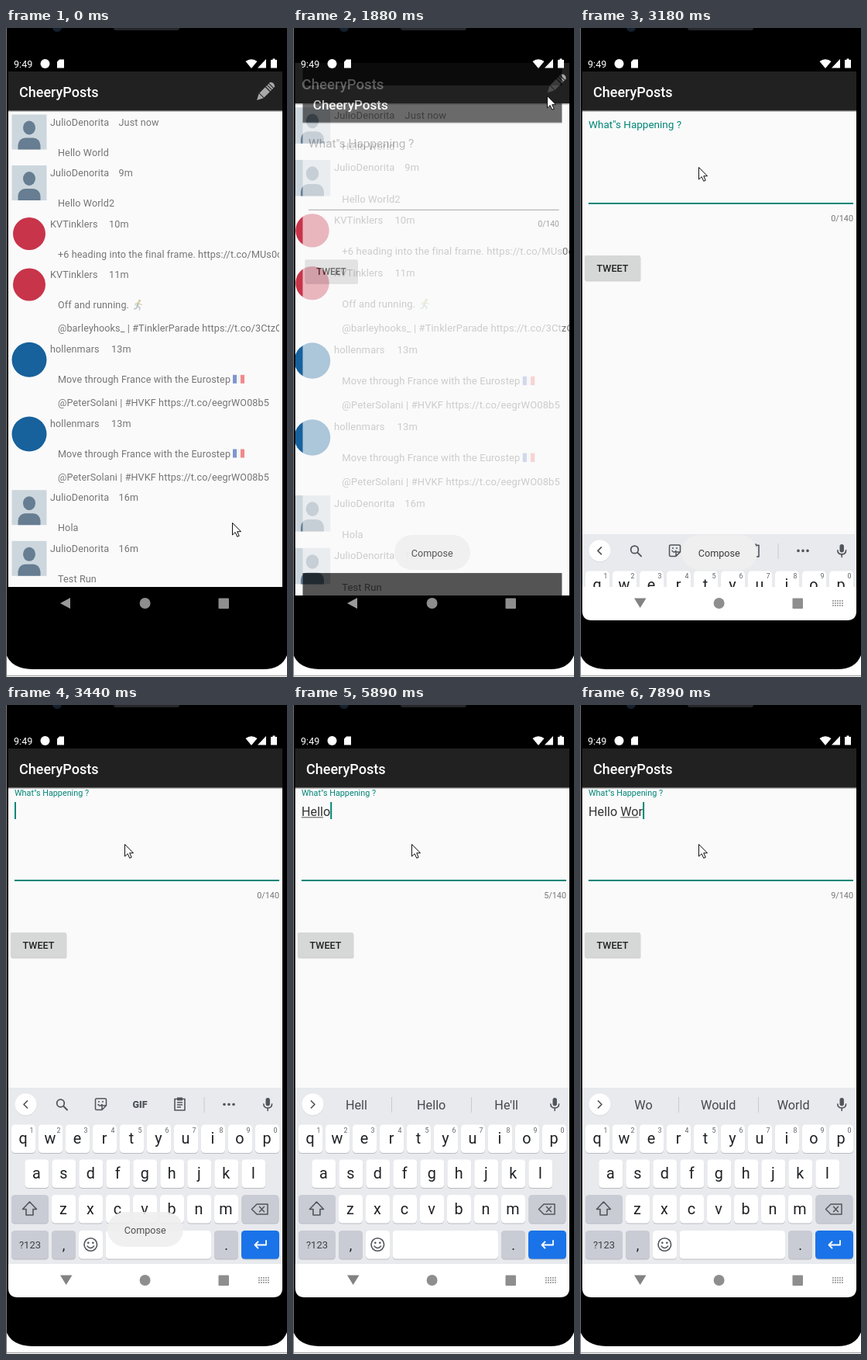
Animation, 363 px wide and 836 px high, one loop 8 s. Source, as an HTML page:

```html
<!DOCTYPE html>
<html lang="en">
<head>
<meta charset="utf-8">
<title>CheeryPosts</title>
<style>
html, body { margin: 0; width: 100%; height: 100%; overflow: hidden; background: #fff; }
svg { display: block; width: 100vw; height: 100vh; font-family: Roboto, sans-serif; }
text { white-space: pre; }
.list { letter-spacing: .12px; }
</style>
</head>
<body>
<svg id="stage" viewBox="0 0 363 836"></svg>
<script>
const LOOP = 8000, INK = 16.2;
const GREY = '#757575', TEAL = '#008577', BAR = '#212121', PAGE = '#fafafa';

const rect = (x, y, w, h, fill, extra = '') =>
  `<rect x="${x}" y="${y}" width="${w}" height="${h}" fill="${fill}" ${extra}/>`;
const circle = (x, y, r, fill, extra = '') =>
  `<circle cx="${x}" cy="${y}" r="${r}" fill="${fill}" ${extra}/>`;
const path = (d, fill, extra = '') => `<path d="${d}" fill="${fill}" ${extra}/>`;
const line = (d, color, w = 1.6) =>
  path(d, 'none', `stroke="${color}" stroke-width="${w}" stroke-linecap="round" stroke-linejoin="round"`);
const text = (x, y, s, size, fill, extra = '') =>
  `<text x="${x}" y="${y}" font-size="${size}" fill="${fill}" ${extra}>${s}</text>`;
const group = (id, body, extra = '') => `<g id="${id}" ${extra}>${body}</g>`;
const MID = 'text-anchor="middle"';

// ---- phone and system bars ----
function phone() {
  return path('M0 0H363V808Q356 826 332 826H34Q6 825 0 806Z', '#000') +
    line('M0.5 0V836', '#777', 1) + line('M0 834.5H363', '#999', 1) +
    circle(66, -1, 6, '#14202e') + rect(139, -4, 85, 7, '#242628', 'rx="3"');
}
function status() {
  return text(10, 50.5, '9:49', 12.6, '#fff') +
    circle(50.5, 46, 6, '#fff') +
    path('M69 40.5H75V51.5H66V43.5Z', '#fff') +
    path('M309.5 43Q317 37.5 324.5 43L317 52Z', '#fff') +
    path('M336 40V51.5H325Z', '#fff') +
    path('M344.5 39.5H347.5V41H350V51.5H342V41H344.5Z', '#fff');
}
function nav() {
  const dots = [0, 1, 2].map(r => [0, 1, 2, 3, 4].map(c =>
    rect(326 + c * 3, 737 + r * 3, 1.8, 1.8, '#999')).join('')).join('');
  return group('navLight', path('M3 720H357V751Q357 763 345 763H15Q3 763 3 751Z', '#fff') +
      path('M70 734.5H85.5L77.7 747Z', '#828282') + dots) +
    group('navDark', path('M83 734V748L70 741Z', '#9a9a9a')) +
    circle(179.6, 741, 7, '#8e8e8e') + rect(274.5, 734.5, 13.5, 13.5, '#8e8e8e', 'rx="1"');
}
// page, bars and title shared by both screens
const frame = () => rect(3, 106, 354, 614, PAGE) + rect(3, 720, 354, 43, '#000') +
  rect(3, 13, 354, 44, '#000') + rect(3, 106, 354, 2, '#000', 'opacity=".25"') +
  rect(3, 56, 354, 50.5, BAR) + text(17, 89, 'CheeryPosts', 18, '#fff', 'font-weight="500"');

// ---- timeline screen ----
const pencil = () => `<g transform="translate(335 82) rotate(45)">` +
  path('M-4.2 7.5H4.2L0 15.5Z', '#a8a8a8') + rect(-4.2, -4, 8.4, 10.5, '#a8a8a8') +
  rect(-4.2, -7.2, 8.4, 2, '#a8a8a8') + rect(-4.2, -10.2, 8.4, 2, '#a8a8a8') +
  path('M-4.2 -11.2V-13Q0 -17 4.2 -13V-11.2Z', '#a8a8a8') + '</g>';

const person = y => rect(7.5, y - 9.5, 45, 45, '#ccd6dd') +
  path(`M15.5 ${y + 35.5}V${y + 30}Q16.5 ${y + 21} 25 ${y + 20.5}H35Q43.5 ${y + 21} 44.5 ${y + 30}V${y + 35.5}Z`, '#667d92') +
  `<ellipse cx="30" cy="${y + 7.5}" rx="8" ry="9" fill="#667d92"/>`;
const avatars = {
  user: person,
  red: y => circle(30, y + 13, 21, '#c8344a'),
  blue: y => circle(30, y + 14, 22.5, '#17619c')
};
const runner = y => `<g opacity=".6">` + circle(172.5, y - 9.5, 1.8, '#c9b258') +
  line(`M171 ${y - 7}L169.5 ${y - 3}`, '#6f9fb8', 2.4) +
  line(`M169.5 ${y - 2}L173 ${y - 1}L172.5 ${y + 2}M169.5 ${y - 2}L168.5 ${y}L165.5 ${y + 1}`, '#8fa0a0', 1.4) +
  line(`M171 ${y - 7}L167.5 ${y - 6}L167 ${y - 4}M171.5 ${y - 6}L175.5 ${y - 4.5}`, '#c9b258', 1.2) + '</g>';
const flag = y => rect(293, y - 10, 5, 11, '#7f96cf') + rect(298, y - 10, 5, 11, '#f4f4f4') +
  rect(303, y - 10, 5, 11, '#f08a8c');

const USER = ['JulioDenorita', 145.5, 'user'], TEAM = ['KVTinklers', 133, 'red'], CLUB = ['hollenmars', 136, 'blue'];
const trip = ['Move through France with the Eurostep', '@PeterSolani | #HVKF https://t.co/eegrWO08b5'];
const posts = [
  [121, USER, 'Just now', ['Hello World']],
  [186.5, USER, '9m', ['Hello World2']],
  [252, TEAM, '10m', ['+6 heading into the final frame. https://t.co/MUs0cQ']],
  [317.5, TEAM, '11m', ['Off and running.', '@barleyhooks_ | #TinklerParade https://t.co/3CtzO4k'], runner],
  [413.3, CLUB, '13m', trip, flag],
  [509, CLUB, '13m', trip, flag],
  [604.7, USER, '16m', ['Hola']],
  [670.3, USER, '16m', ['Test Run']]
];
const post = ([y, [name, ageX, face], age, body, emoji]) => avatars[face](y) +
  text(57, y + 4.5, name, 12.6, GREY) + text(ageX, y + 4.5, age, 12.6, GREY) +
  body.map((s, i) => text(67, y + 43.5 + i * 30.3, s, 12.6, GREY)).join('') +
  (emoji ? emoji(y + 43.5) : '');
const timeline = () => frame() +
  circle(332, 82.5, 15, '#fff', 'id="ripple" opacity=".14"') + pencil() +
  `<g class="list" clip-path="url(#listClip)">${posts.map(post).join('')}</g>`;

// ---- compose screen ----
const compose = () => frame() +
  `<text id="hint" x="11">What"s Happening ?</text>` +
  text(11, 143, '', INK, '#333', 'id="typed"') + rect(11, 144.3, 0, 1, '#555', 'id="under"') +
  rect(11, 125, 2, 22, TEAL, 'id="caret"') + rect(11, 225, 342, 1, GREY, 'id="rule"') +
  text(353, 248.5, '0/140', 10.8, GREY, 'id="count" text-anchor="end"') +
  rect(6.5, 294.5, 72, 32, '#000', 'rx="2" opacity=".16"') + rect(6, 293, 72, 32, '#d6d7d7', 'rx="2"') +
  text(42, 314, 'TWEET', 12.6, '#212121', MID + ' font-weight="500"');

const toast = () => rect(131, 653, 98, 45, '#efefef', 'rx="22.5"') +
  text(179.8, 681, 'Compose', 12.6, '#3a3a3a', MID);

// ---- keyboard ----
const DARK = '#202124', ICON = '#50555a', SIDE = '#c9ccd4';
const key = (x, y, w, fill = '#fff') => rect(x, y + 1, w, 36.5, '#b9bcc2', 'rx="4.5"') + rect(x, y, w, 36.5, fill, 'rx="4.5"');
const keyRow = (chars, x0, y, digits) => [...chars].map((c, i) => {
  const x = x0 + 35 * i;
  return key(x, y, 31) + text(x + 15, y + 24.7, c, 19.8, DARK, MID) +
    (digits ? text(x + 26, y + 10, (i + 1) % 10, 8.8, '#5f6368', MID) : '');
}).join('');
const tools = () =>
  circle(70.5, 513, 4.8, 'none', `stroke="${ICON}" stroke-width="1.8"`) + line('M74.5 517L79 521.5', ICON, 2) +
  line('M117 507H128Q129.5 507 129.5 508.5V516L124 521.5H117Q115.5 521.5 115.5 520V508.5Q115.5 507 117 507ZM129.5 516H124V521.5M119 514.5Q121.5 518 124 514.5', ICON, 1.5) +
  circle(120, 511, 1, ICON) + circle(125, 511, 1, ICON) +
  text(173, 518.5, 'GIF', 12.5, ICON, MID + ' font-weight="900"') +
  line('M218 507.5H231V522H218ZM221.5 512H227.5M221.5 515H227.5M221.5 518H225.5', ICON, 1.6) + rect(221, 505.5, 7, 4, ICON) +
  rect(255.5, 505, 1, 20, '#c8cbcf') +
  [282, 288, 294].map(x => circle(x, 514.5, 1.8, ICON)).join('');
const words = () => rect(127, 505, 1, 20, '#c8cbcf') + rect(230, 505, 1, 20, '#c8cbcf') +
  [82, 178.7, 275.7].map((x, i) => text(x, 521, '', INK, '#45494d', `${MID} id="word${i}"`)).join('');
const keyboard = () => rect(3, 493, 354, 228, '#e8eaed') +
  circle(25.5, 515.3, 14, '#cfd2d6') + circle(25.5, 514.5, 14, '#fff') +
  group('chevron', line('M27.5 510L23 514.5L27.5 519', ICON, 1.7)) +
  group('tools', tools()) + group('words', words()) +
  rect(335.5, 506, 5.4, 10.5, ICON, 'rx="2.7"') + line('M332.8 514Q333 519 338.2 519Q343.4 519 343.6 514M338.2 519V522.5', ICON, 1.6) +
  keyRow('qwertyuiop', 7, 540.5, true) + keyRow('asdfghjkl', 24.3, 585.5) + keyRow('zxcvbnm', 59, 631) +
  key(7, 631, 48, SIDE) + line('M30.5 640L21.5 649.5H26V657H35V649.5H39.5Z', ICON) +
  key(304.5, 631, 48, SIDE) + line('M324 643H338V656H324L317.5 649.5ZM327.5 646.3L333.5 652.7M333.5 646.3L327.5 652.7', ICON, 1.5) +
  key(7, 677, 48, SIDE) + text(31, 700, '?123', 13, '#3c4043', MID) +
  key(59, 677, 31, SIDE) + text(74.5, 702, ',', 18, DARK, MID) +
  key(94, 677, 31) + circle(109.3, 695, 8.3, 'none', `stroke="${ICON}" stroke-width="1.6"`) +
  circle(106.3, 692.7, 1.3, ICON) + circle(112.3, 692.7, 1.3, ICON) + line('M105 697Q109.3 702 113.6 697', ICON, 1.5) +
  key(128.5, 677, 136.5) + key(269, 677, 31, SIDE) + text(284.5, 702, '.', 18, DARK, MID) +
  key(304, 677, 49, '#1a73e8') + line('M336 690V695.5H321.5M325.5 691.5L321.5 695.5L325.5 699.5', '#fff', 1.8);

const pointer = () => path('M.5 .5V16L4.2 12.6L6.8 18.3L9.2 17.2L6.7 11.7H11.5Z', '#fff',
  'stroke="#111" stroke-width="1" stroke-linejoin="round"');

const stage = document.getElementById('stage');
stage.innerHTML =
  `<defs><clipPath id="screen">${rect(3, 38, 354, 725, '#000')}</clipPath>` +
  `<clipPath id="listClip">${rect(3, 106, 350, 614, '#000')}</clipPath>` +
  `<clipPath id="keyClip">${rect(3, 480, 354, 240, '#000')}</clipPath></defs>` +
  phone() + `<g clip-path="url(#screen)">${group('timeline', timeline())}${group('compose', compose())}</g>` +
  `<g clip-path="url(#keyClip)">${group('keyboard', keyboard())}</g>` +
  nav() + status() + group('toast', toast()) + group('pointer', pointer());

// ---- step tables: time first, values hold until the next row ----
const moves = [[0, 292, 637], [120, 288, 622], [245, 276, 565], [370, 267, 480], [490, 277, 401], [640, 342, 176],
  [790, 345, 121], [940, 338, 100], [1060, 328, 87], [2430, 290, 113], [2550, 211, 152], [2700, 166, 172],
  [2820, 160, 176], [2940, 153, 179]];
const opening = [[0, 0, 0], [1760, .15, .25], [1880, .64, .66], [2000, .93, 1], [2140, 1, 1]];
const toasts = [[0, 0], [1880, .85], [2000, 1], [3440, .88], [3690, .6], [3810, .25], [3950, 0]];
const focus = [[0, 0], [3180, .5], [3300, 1]];
const rise = [[0, 0], [3180, .3], [3300, .75], [3440, 1]];
const strip = [[0, 1], [4340, .5], [4460, 0]];
// text, underlined characters from/to, caret shown
const typing = [[0, '', 0, 0, 0], [3440, '', 0, 0, 1], [3950, '', 0, 0, 0], [4340, 'H', 0, 0, 1], [4580, 'H', 0, 1, 1],
  [4840, 'H', 0, 1, 0], [4960, 'He', 0, 2, 1], [5500, 'He', 0, 2, 0], [5620, 'Hel', 0, 2, 1], [5740, 'Hel', 0, 3, 1],
  [5890, 'Hello', 0, 4, 1], [6150, 'Hello', 0, 5, 1], [6270, 'Hello ', 0, 0, 1], [6930, 'Hello W', 0, 0, 1],
  [7180, 'Hello W', 6, 7, 1], [7490, 'Hello W', 6, 7, 0], [7620, 'Hello Wo', 6, 7, 1], [7770, 'Hello Wo', 6, 8, 1],
  [7890, 'Hello Wor', 6, 8, 1]];
const guesses = [[0, '', '', ''], [4580, 'H', 'How', 'Hey'], [4960, 'He', 'Hey', 'Hello'], [5740, 'Hel', 'Hello', 'Help'],
  [5890, 'Hell', 'Hello', "He'll"], [6150, 'Hello', 'Hellos', 'Help'], [6390, 'I', 'there', 'and'],
  [7180, 'W', 'World', 'Would'], [7770, 'Wo', 'Would', 'World']];

const at = (table, t) => table.findLast(row => row[0] <= t).slice(1);
const el = id => document.getElementById(id);
const set = (id, attrs) => { for (const k in attrs) el(id).setAttribute(k, attrs[k]); };
const fade = (id, v) => set(id, { opacity: v });
const zoom = s => `translate(180 388) scale(${s}) translate(-180 -388)`;
const pen = document.createElement('canvas').getContext('2d');
const widthOf = s => { pen.font = `${INK}px Roboto, sans-serif`; return pen.measureText(s).width; };

function draw(t) {
  const [mx, my] = at(moves, t);
  set('pointer', { transform: `translate(${mx} ${my})` });

  const [grow, show] = at(opening, t);
  set('timeline', { transform: zoom(1 + .052 * grow), opacity: grow < 1 ? 1 : 0 });
  set('compose', { transform: zoom(.85 + .15 * grow), opacity: show });
  fade('ripple', t >= 1620 && t < 1760 ? .14 : 0);
  fade('toast', at(toasts, t)[0]);

  const [f] = at(focus, t);
  set('hint', { y: 140.7 - 23.7 * f, 'font-size': 16.2 - 5.4 * f, fill: f ? TEAL : '#9b9b9b' });
  set('rule', { height: f ? 2 : 1, fill: f ? TEAL : GREY });

  const [up] = at(rise, t);
  set('keyboard', { transform: `translate(0 ${(1 - up) * 227})`, opacity: up ? 1 : 0 });
  fade('navLight', up ? 1 : 0);
  fade('navDark', up ? 0 : 1);

  const [s, from, to, on] = at(typing, t);
  el('typed').textContent = s;
  el('count').textContent = s.length + '/140';
  const left = widthOf(s.slice(0, from));
  set('under', { x: 11 + left, width: widthOf(s.slice(0, to)) - left });
  set('caret', { x: 11 + widthOf(s), opacity: on });

  const [tool] = at(strip, t);
  fade('tools', tool);
  fade('words', 1 - tool);
  set('chevron', { transform: tool < 1 ? 'rotate(180 25.5 514.5)' : '' });
  at(guesses, t).forEach((w, i) => { el('word' + i).textContent = w; });
}

function tick() {
  draw(performance.now() % LOOP);
  requestAnimationFrame(tick);
}
tick();
</script>
</body>
</html>
```
